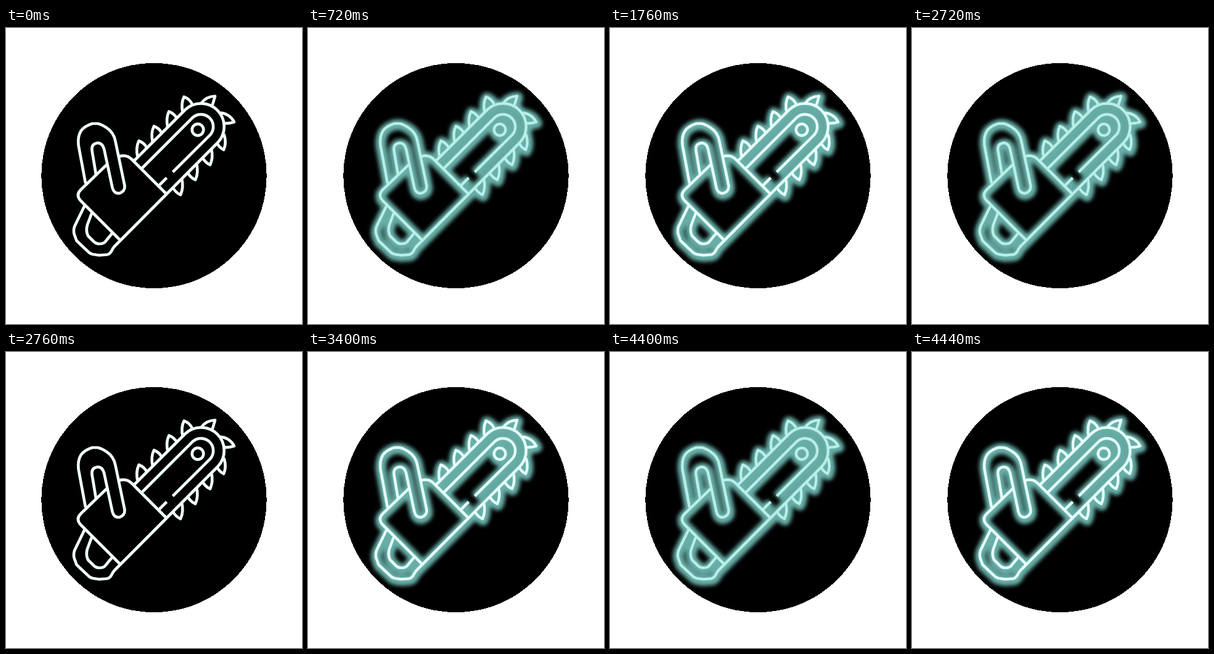
Write an HTML page that moves like this. It is 480 px wide and 480 px high and loops after 5 s.

```html
<!DOCTYPE html>
<html lang="en">
<head>
<meta charset="utf-8">
<title>Neon chainsaw</title>
<style>
  html, body { margin: 0; width: 100%; height: 100%; overflow: hidden; background: #fff; }
  svg { display: block; width: 100vw; height: 100vh; }
  #saw { fill: none; stroke-linecap: butt; stroke-linejoin: round; }
</style>
</head>
<body>
<svg viewBox="0 0 480 480">
  <defs>
    <filter id="blur" filterUnits="userSpaceOnUse" x="60" y="60" width="360" height="360" color-interpolation-filters="sRGB">
      <feGaussianBlur stdDeviation="3.2"/>
    </filter>
    <g id="saw">
      <!-- body -->
      <path d="M183 208.5Q195 204.500 204 213L260 269M163.500 221.500L122 261.500C115 268 116 274.500 121 280L185 344"/>
      <!-- top handle -->
      <path d="M129 252L117.500 190Q116 176 121.500 167Q127 159 140 155L148 155Q153 155.500 162 161Q175 169 177.500 184L192.500 256Q193 265 184 268Q175 269 172.500 259L159 196Q156 186 148 186.500Q138 188 139.500 199L146 238"/>
      <!-- rear handle -->
      <path d="M128 287L111.500 321Q109 327 110.500 334L114.500 345L133 362.500Q136 366 141 367L151 368.500L164 367.500Q169 366.500 172 360Q173 357.500 176 354M139.500 299L132 319Q129 329 133 337L142.500 346.500Q146 350 152 350Q158 350 161 346.500L172.500 332.500"/>
      <!-- guide bar -->
      <path d="M207 216L290.700 132.500A37.500 37.500 0 0 1 343.700 185.500L175 355"/>
      <path d="M219.500 228.500L303.100 144.900A20 20 0 0 1 331.300 173.100L270.500 233.500M260.500 243L247.500 256"/>
      <circle cx="311" cy="165" r="9.300"/>
      <g id="teeth"></g>
    </g>
  </defs>
  <rect width="480" height="480" fill="#fff"/>
  <circle cx="240" cy="239.500" r="182.700" shape-rendering="crispEdges"/>
  <use id="glow" href="#saw" x="1" y="2" stroke="#68aea7" stroke-width="17.500" filter="url(#blur)"/>
  <use id="edge" href="#saw" stroke-width="4.700"/>
  <use id="core" href="#saw" stroke-width="3.300"/>
</svg>
<script>
const $ = id => document.getElementById(id);
const LOOP = 5000;

const looks = {
  off: { glow: 0, edge: '#d6faf4', core: '#fbffff' },
  dim: { glow: 1, edge: '#a3ddd6', core: '#b9f0e9' },
  on:  { glow: 1, edge: '#bdf3ec', core: '#eafffc' }
};

// Flicker: each look holds until the next start time.
const steps = [
  [0, 'off'], [720, 'dim'], [760, 'on'], [1400, 'off'],
  [1720, 'dim'], [1760, 'on'], [2720, 'dim'], [2760, 'off'],
  [3400, 'on'], [3600, 'dim'], [3640, 'off'], [4400, 'dim'], [4440, 'on']
];

function tooth(d, x = 0, y = 0) {
  const p = document.createElementNS('http://www.w3.org/2000/svg', 'path');
  p.setAttribute('d', d);
  p.setAttribute('transform', `translate(${x} ${y})`);
  $('teeth').append(p);
}

for (let i = 0; i < 4; i++) {
  tooth('M213.500 209.500Q210 194 215.500 183Q224 186 228.500 194.500', i * 24.4, i * -23.8);
}
for (let i = 0; i < 3; i++) {
  tooth('M270.500 258.500Q275 267 283 270.500Q288.500 259 285 244', i * 24, i * -24.3);
}
tooth('M342.500 187Q346 194 353 197.500Q358 187 353.500 172');
tooth('M317 121.500Q325 111 339 110.500Q337 118 334.500 125.500');
tooth('M347.500 137.500Q363 139 370 152.500Q362 155 354 154.500');

function draw(t) {
  const look = looks[steps.filter(s => s[0] <= t).pop()[1]];
  $('glow').setAttribute('opacity', look.glow);
  $('edge').setAttribute('stroke', look.edge);
  $('core').setAttribute('stroke', look.core);
}

const start = performance.now();
function tick() {
  draw((performance.now() - start) % LOOP);
  requestAnimationFrame(tick);
}
tick();
</script>
</body>
</html>
```
